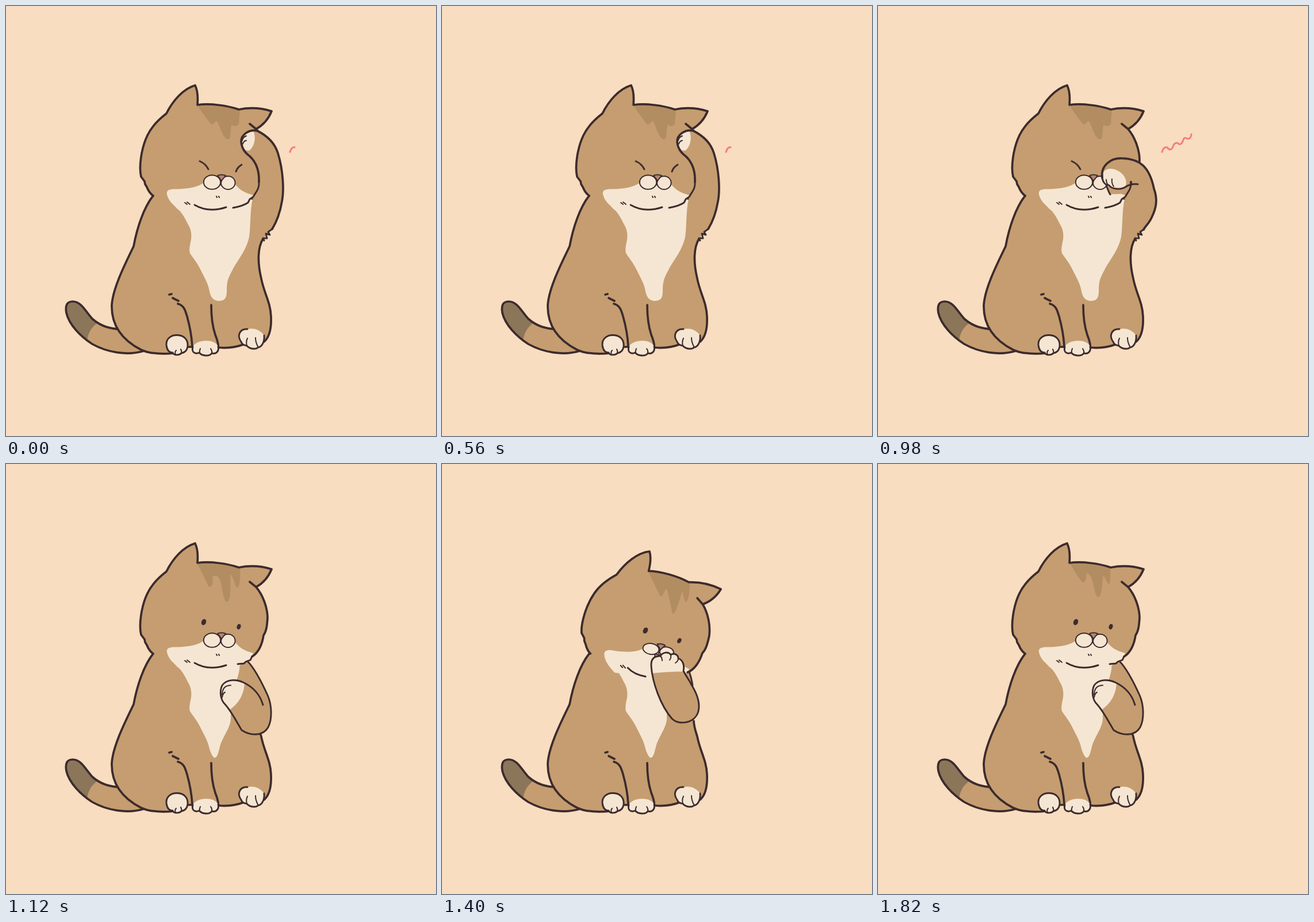
Recreate the animation shown at these times as an HTML page. Size 748 px wide and 748 px high, loop 1960 ms.

```html
<!DOCTYPE html>
<html lang="en">
<head>
<meta charset="utf-8">
<title>Cat washing its face</title>
<style>
html, body { margin: 0; width: 100%; height: 100%; overflow: hidden; background: #f8ddc0; }
svg { display: block; width: 100vw; height: 100vh; }
path, ellipse { fill: none; stroke-linecap: round; stroke-linejoin: round; }
.fur { fill: #c59d70; }
.cream { fill: #f5e6d3; }
.line { stroke: #3c2b2d; stroke-width: 3.7; }
.mid { stroke: #3c2b2d; stroke-width: 2.9; }
.thin { stroke: #3c2b2d; stroke-width: 2; }
.ink { fill: #3c2b2d; }
.stripe { fill: #b38d62; }
.tip { fill: #8c765a; }
.pink { fill: #e79b98; }
.nose { fill: #b38579; }
.spark { stroke: #f47c82; stroke-width: 3; }
</style>
</head>
<body>
<svg id="stage" viewBox="0 0 748 748"></svg>
<script>
const STEP = 140;
const svg = document.getElementById('stage');
const p = (cls, d, extra = '') => `<path class="${cls}" d="${d}" ${extra}/>`;
const oval = (cls, x, y, rx, ry, turn = 0) =>
  `<ellipse class="${cls}" cx="${x}" cy="${y}" rx="${rx}" ry="${ry}" transform="rotate(${turn} ${x} ${y})"/>`;

const TAIL = 'M200 562C176 562 160 553 150 544C138 531 131 514 116 514C105 514 103 522 105 534' +
  'C110 555 130 575 150 588C175 602 210 609 240 600';
const BODY = 'M256 330C240 350 228 385 222 418C208 447 186 490 184 520C183 555 200 580 235 598' +
  'C250 605 270 606 292 604L318 593L328 596L370 594C390 596 405 592 415 588L449 584' +
  'C457 577 462 562 461 540C460 515 449 500 444 474';
const BODY_LINE = BODY.replace('L318 593L328 596L370 594', 'M318 593L325 593M370 594');

// How the flank continues above the hip: stroke, then the closing fill edge.
const FLANK = {
  up: ['C437 445 438 420 447 405', 'L462 388L430 332L400 310L290 310Z'],
  rest: ['L442 468', 'L460 440L455 402C445 380 432 355 420 343L400 310L290 310Z'],
  lick: ['C441 464 438 456 438 447', 'L444 410L436 385C433 368 428 352 420 343L400 310L290 310Z']
};

const CHEST_LEFT = 'M290 335C288 343 297 353 302 356C312 368 314 376 318 382C322 390 323 397 322 406' +
  'C320 416 318 424 320 430C328 442 332 446 337 456C346 474 351 482 353 492';
const CHEST = {
  wide: CHEST_LEFT + 'C356 508 361 513 371 513C384 512 384 504 384 492C384 474 391 466 396 455' +
    'C406 438 418 424 423 402C426 380 424 360 429 335Z',
  slim: CHEST_LEFT + 'C356 503 360 511 363 511C370 510 370 494 375 483C384 464 390 456 391 444' +
    'L391 400C402 376 408 360 406 346Z'
};

const SKULL = 'M256 330C250 326 247 320 245 315L242 310L241 305L235 297C231 280 235 248 246 225' +
  'C254 208 266 197 279 187C290 165 308 144 329 138C334 148 334 160 333 172C355 169 385 173 405 180' +
  'C425 176 446 178 462 183C456 198 446 208 435 214';
const CHEEK = 'C447 228 455 250 455 268C454 282 453 291 448 298C446 312 440 328 428 335';
const FACE = 'M280 328C278 319 287 318 297 318.5C318 318 335 315 346 306L398 309C404 318 414 325 430 329L428 335' +
  'C420 341 412 346 405 352L303 356C292 347 283 340 280 328Z';

const STRIPES = {
  soft: 'M334 174C342 187 350 197 356 205C361 209 363 200 367 200C373 210 377 231 386 232' +
    'C393 232 389 215 393 206C398 212 404 208 405 205L407 182Q370 170 334 174Z',
  long: 'M333 174C340 188 346 198 351 211C354 217 360 212 360 204L359 195C366 193 371 196 373 204' +
    'C377 218 378 238 384 240C391 240 391 214 390 192C396 196 398 213 402 215C407 215 408 198 407 182Q370 170 333 174Z',
  fine: 'M335 174C343 189 350 200 356 206C361 208 363 197 363 190C371 191 374 206 376 216' +
    'C379 230 382 234 386 230C391 220 389 205 392 194C396 198 398 208 402 209C405 209 404 192 404 181Q370 170 335 174Z',
  sharp: 'M333 174C343 188 353 203 361 213C364 213 366 201 368 197C375 208 381 227 386 239' +
    'C391 239 394 216 396 197C400 206 403 214 406 215C410 210 409 192 407 182Q370 170 333 174Z'
};

const SPARK = 'M494 254C496 247 499 245 503 246C506 250 510 252 513 245C514 240 517 238 521 238' +
  'C524 243 529 240 531 233C533 227 536 230 539 231C543 231 545 227 545 223';
const CHIN = 'M440 306C441 318 435 323 430 332L424 336L421 342C414 347 406 349 395 351';
const TUFT = 'M463 388L456 393L459 398L452 396L454 404L447 404L449 408';
const LEFT_PAW = 'M279 590C278 580 286 572 298 572.5C311 573 317 582 316 592C315 600 311 603 305 604' +
  'C301 608 292 608 290 603C283 603 280 598 279 590Z';
const RIGHT_PAW = 'M420 562C407 561 401 573 409 584C412 592 418 590 419 591C425 598 436 597 438 594' +
  'C446 593 450 583 449 573';

function base(flank, chest) {
  const [edge, close] = FLANK[flank];
  return p('fur', TAIL) +
    p('tip', 'M158 552C138 531 131 514 116 514C105 514 103 522 105 534C110 555 126 571 141 581C144 567 148 560 158 552Z') +
    p('line', TAIL) +
    p('fur', BODY + edge + close) + p('line', BODY_LINE + edge) +
    p('line', 'M284 502l4-1M290 508l10 5M299 518C310 521 312 530 315 540C320 558 323 575 324 592' +
      'M357 520C357 545 360 560 364 572C368 582 370 588 369 594') +
    p('cream mid', LEFT_PAW) +
    p('thin', 'M296 599q-3 3-1 7M304 597q2 4 1 7') +
    p('cream', 'M325 593C331 580 362 578 369 592C370 601 366 605 358 604C354 610 340 609 336 604C326 606 322 600 325 593Z') +
    p('mid', 'M325 593C322 603 330 606 336 603C341 609 354 610 358 604C366 606 371 600 369 592') +
    p('thin', 'M338 596q-2 4-1 8M356 596q3 4 2 8') +
    p('cream', RIGHT_PAW + 'C443 564 432 559 420 562Z') + p('mid', RIGHT_PAW) +
    p('thin', 'M420 578q-3 6-1 13M434 577q0 8 4 15') +
    p('cream', CHEST[chest]);
}

function head({ tilt = 0, eyes = 'open', stripe = 'soft', lick = false, chin = true }) {
  const move = `translate(${329 + 32 * tilt} ${138 + 14 * tilt}) rotate(${9.2 * tilt}) translate(-329 -138)`;
  const ry = lick ? 9.5 : 12.3;
  const cy = lick ? 305 : 306.5;
  const look = eyes === 'open'
    ? oval('ink', 344, 275, 4, 5.5, 20) + oval('ink', 405, 283, 3.3, 4.7, 20)
    : p('mid', 'M337 270Q347 274 352 284') + (eyes === 'shut' ? p('mid', 'M410 276Q402 281 400 288') : '');
  return `<g transform="${move}">` +
    p('fur', SKULL + CHEEK + 'Z') + p('stripe', STRIPES[stripe]) + p('cream', FACE) +
    p('line', SKULL + 'M424 205L435 214' + CHEEK) +
    (chin ? p('mid', 'M428 335L425 341L417 344L414 347L403 348') : '') +
    look +
    (lick ? p('pink thin', 'M367 313C366 328 380 329 381 313Z') : '') +
    oval('cream thin', 358.5, cy, lick ? 14 : 14.7, ry) + oval('cream thin', 386.3, cy + 1, 12.3, ry - 0.8) +
    p('nose thin', 'M368 295Q375 292 382 295L375 304Z') + p('thin', 'M375 304L373 311') +
    p('thin', 'M311 342l4 3M315 341l5 4' + (lick ? '' : 'M366 331l1 2M370 331l1 2')) +
    p('mid', lick ? 'M324 344Q337 354 357 354' : 'M328 346C345 356 365 356 383 350') +
    '</g>';
}

function armUp() {
  const outer = 'M437 217C455 226 468 240 473 256C482 285 484 320 480 340C477 358 471 375 463 388';
  return p('fur', outer + 'L447 405L430 336L428 334C434 325 441 318 440 306C441 281 432 267 420 258C414 254 409 246 409 236C409 223 422 214 437 217Z') +
    p('cream', 'M409 236C409 223 420 217 431 219C435 230 432 244 424 251C418 253 412 250 409 236Z') +
    p('line', outer) + p('line', 'M437 217C424 214 409 223 409 236C410 246 413 252 420 258C432 267 441 281 440 306') +
    p('mid', CHIN) + p('mid', TUFT) +
    p('thin', 'M411 234q1-6 7-8M412 240q1-5 6-6');
}

// dy slides the paw along the face while the elbow stays put.
function armRub(dy) {
  const y = v => v + dy;
  const outer = `M390 ${y(284)}C387 ${y(263)} 404 ${y(249)} 425 ${y(250)}` +
    `C455 ${y(251)} 472 ${y(264)} 480 ${310 + dy / 2}C487 337 484 352 476 368C471 379 464 384 462 389`;
  const paw = `M390 ${y(278)}C389 ${y(290)} 395 ${y(297)} 402 ${y(297)}C407 ${y(304)} 422 ${y(305)} 430 ${y(300)}`;
  return p('fur', `${outer}L447 405L430 336L428 334C434 325 442 318 440 ${y(296)}L430 ${y(300)}` +
      `C422 ${y(305)} 407 ${y(304)} 402 ${y(297)}C395 ${y(297)} 390 ${y(292)} 390 ${y(284)}Z`) +
    p('fur', `M397 ${y(299)}L432 ${y(298)}L440 306L434 322C420 330 409 326 405 328C400 321 398 312 397 ${y(299)}Z`) +
    p('cream', paw + `C436 ${y(288)} 426 ${y(276)} 418 ${y(272)}C406 ${y(265)} 394 ${y(267)} 390 ${y(278)}Z`) +
    p('line', outer) + p('line', `M440 ${y(296)}L440 306`) +
    p('mid', `${paw}C436 ${y(296)} 444 ${y(294)} 452 ${y(295)}M397 ${y(299)}C398 312 400 322 404 328`) +
    p('thin', `M397 ${y(287)}q0 6 4 10M407 ${y(286)}q-1 7 3 13`) +
    p('mid', CHIN) + p('mid', TUFT);
}

function armRest() {
  const fore = 'C463 420 463 445 456 458C447 474 425 473 410 463C402 450 392 430 381 418' +
    'C373 410 371 396 376 385C384 374 400 374 413 380C430 388 442 402 447 419';
  return p('fur', 'M455 402' + fore + 'Z') +
    p('cream', 'M390 427L381 418C373 410 371 396 376 385C384 374 400 374 415 381C414 400 406 415 390 427Z') +
    p('mid', 'M420 343C432 355 445 380 455 402' + fore) +
    p('thin', 'M391 385C382 385 376 390 376 402M376 406q1-7 5-9');
}

function armLick(dy) {
  const toes = 'M364 352C363 339 369 334 380 334C384 327 394 326 398 332C404 328 411 332 411 338C419 341 422 350 420 360';
  const fore = 'C424 368 430 376 434 384C445 402 449 418 446 430C441 450 413 456 400 443C380 420 366 380 364 352Z';
  return `<g transform="translate(0 ${dy})">` +
    p('fur', toes + fore) +
    p('cream', toes + 'L420 361Q394 361 366 364Z') +
    p('mid', toes + fore) +
    p('thin', 'M380 334q3 3 3 8M398 332q1 5-2 9M411 338q0 5-5 8') + '</g>';
}

const spark = part => p('spark', SPARK, `pathLength="100" stroke-dasharray="${part} 200"`);

const up = () => base('up', 'wide') + head({ eyes: 'shut', chin: false }) + armUp() + spark(17);
const rub = (dy, part) => base('up', 'wide') + head({ eyes: 'half', chin: false }) + armRub(dy) + spark(part);
const rest = stripe => base('rest', 'slim') + head({ stripe }) + armRest();
const lick = (tilt, dy) => base('lick', 'slim') +
  p('mid', 'M420 343C428 352 433 368 436 385') +
  head({ tilt, stripe: 'sharp', lick: true, chin: false }) + armLick(dy);

const wash = [up(), rub(-9, 42), rub(0, 52), rub(15, 100)];
const raise = lick(0, 12);
const poses = [...wash, ...wash, rest('long'), raise, lick(1, 0), lick(0.1, 0), raise, rest('fine')];

let shown = -1;
const start = performance.now();
function draw(now) {
  const step = Math.floor(Math.max(0, now - start) / STEP) % poses.length;
  if (step !== shown) svg.innerHTML = poses[shown = step];
  requestAnimationFrame(draw);
}
draw(start);
</script>
</body>
</html>
```
